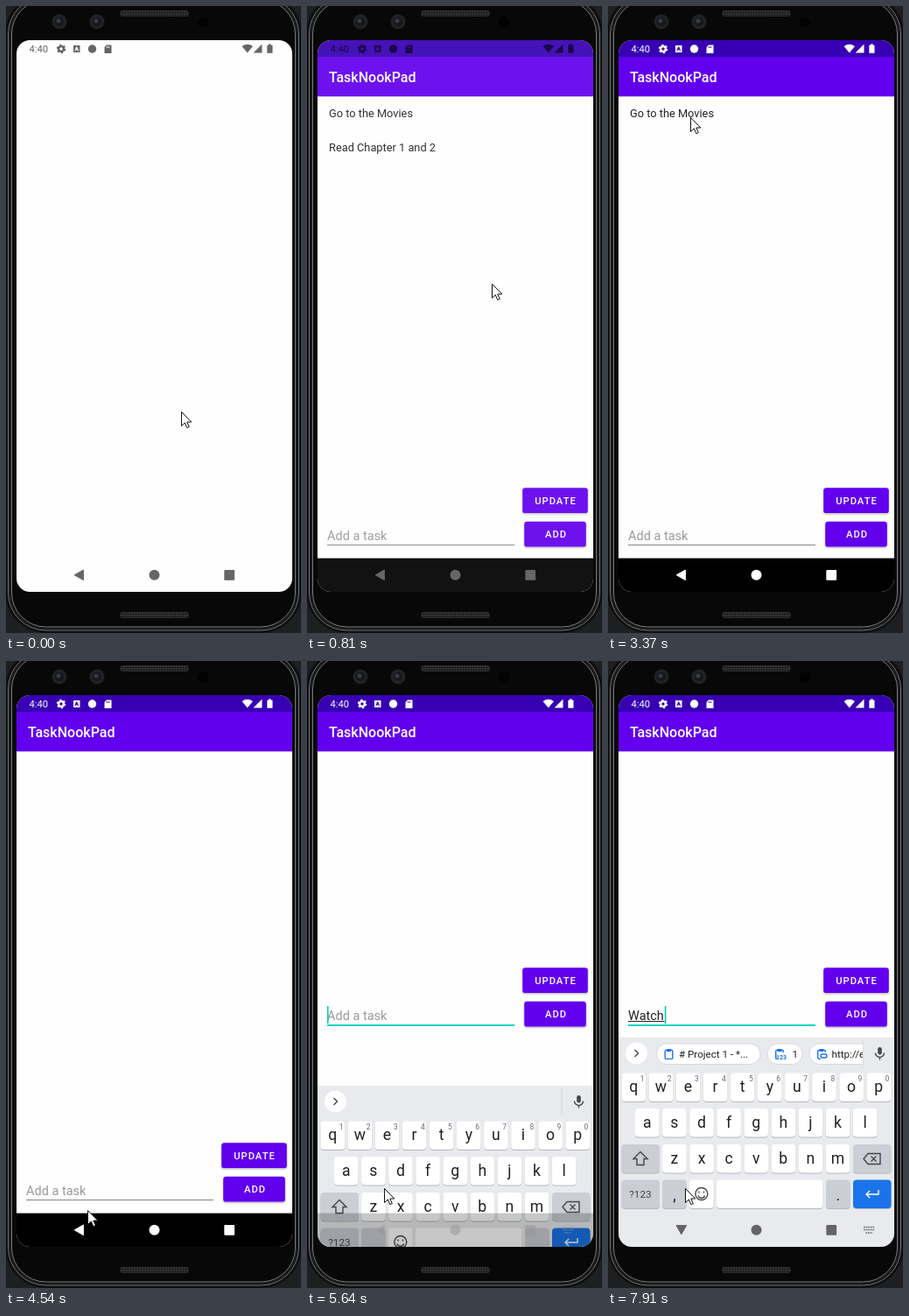
An HTML page that plays this animation: 337x716 px, repeating every 8000 ms.

```html
<!DOCTYPE html>
<html lang="en">
<head>
<meta charset="utf-8">
<title>Task list on a phone</title>
<style>
  html, body { margin: 0; width: 100%; height: 100%; overflow: hidden; background: #050505; }
  svg { display: block; width: 100%; height: 100%; font-family: Roboto, "Noto Sans", sans-serif; }
  text { white-space: pre; }
  .mid { text-anchor: middle; }
  .button { font-size: 11.2px; font-weight: 500; letter-spacing: 1px; fill: #fff; }
  .letter { font-size: 17.6px; fill: #1f2023; }
  .digit { font-size: 8.5px; fill: #666a70; }
  .chip { font-size: 11.6px; fill: #202124; }
  .line { fill: none; stroke: #43474c; stroke-width: 1.4; }
  .blue { fill: none; stroke: #1a73e8; stroke-width: 1.4; }
</style>
</head>
<body>
<svg viewBox="0 0 337 716">
  <defs>
    <clipPath id="screen"><rect x="12" y="39" width="315" height="630" rx="15.500"/></clipPath>
    <clipPath id="strip"><rect x="50" y="430" width="241" height="38"/></clipPath>
    <pattern id="mesh" width="3" height="3" patternUnits="userSpaceOnUse">
      <rect width="3" height="3" fill="#343434"/><circle cx="1.500" cy="1.500" r="1.100" fill="#121212"/>
    </pattern>
    <filter id="shadow" x="-10%" y="-20%" width="120%" height="150%">
      <feDropShadow dx="0" dy="1.2" stdDeviation=".9" flood-opacity=".3"/>
    </filter>
    <g id="clipboard">
      <rect x="-4.3" y="-4.6" width="8.6" height="10" rx="1" class="blue"/>
      <path d="M-2.5-6h5v3h-5z" fill="#1a73e8"/>
    </g>
  </defs>

  <g id="phone" fill="none">
    <rect width="337" height="716" fill="#1e1f21"/>
    <rect x="0" y="-14" width="337" height="729" rx="46" fill="#0b0b0b" stroke="#101010" stroke-width="2"/>
    <rect x="2.500" y="-11" width="332" height="724" rx="43" stroke="#77797b"/>
    <rect x="4.500" y="-9" width="328" height="720" rx="41" stroke="#1c1d1e" stroke-width="2"/>
    <rect x="6.500" y="-7" width="324" height="716" rx="39" fill="#080808" stroke="#7c7e80"/>
    <rect x="130" y="5" width="79" height="7" rx="3.500" fill="url(#mesh)"/>
    <rect x="130" y="692" width="79" height="7" rx="3.500" fill="url(#mesh)"/>
    <g id="lenses"></g>
    <circle cx="225" cy="18.500" r="6" fill="#020202"/>
  </g>

  <g clip-path="url(#screen)">
    <rect x="12" y="39" width="315" height="630" fill="#fefefe"/>
    <g id="app">
      <rect x="12" y="58" width="315" height="45.300" fill="#6200ee"/>
      <rect x="12" y="39" width="315" height="19.200" fill="#3700b3"/>
      <text x="25" y="87" font-size="16" font-weight="500" fill="#fff">TaskNookPad</text>
      <g font-size="12.8" fill="#222">
        <text id="first" x="25" y="127">Go to the Movies</text>
        <text id="second" x="25" y="165.500">Read Chapter 1 and 2</text>
      </g>
      <g id="form">
        <g fill="#6200ee" filter="url(#shadow)">
          <rect x="246.200" y="550.200" width="74.600" height="28.900" rx="3.200"/>
          <rect x="248.200" y="588.700" width="70.600" height="28.900" rx="3.200"/>
        </g>
        <text class="button mid" x="284" y="568.800">UPDATE</text>
        <text class="button mid" x="284.500" y="607.200">ADD</text>
        <path d="M23 615.500H237" stroke="#868686"/>
        <path id="focus" d="M23 616H237" stroke="#03d5c0" stroke-width="2"/>
        <text id="entry" x="23" y="609.500" font-size="14.5"></text>
        <path id="composing" stroke="#222"/>
        <rect id="caret" y="594" width="1.600" height="20" fill="#03cdb9"/>
      </g>
      <rect x="12" y="630.600" width="315" height="39"/>
    </g>

    <g id="status" fill="currentColor">
      <text x="26.500" y="53" font-size="11.2">4:40</text>
      <circle cx="63" cy="49" r="2.900" fill="none" stroke="currentColor" stroke-width="2.400"/>
      <circle cx="63" cy="49" r="4.600" fill="none" stroke="currentColor" stroke-width="1.300" stroke-dasharray="2.400 2.417"/>
      <path fill-rule="evenodd" d="M77 45h7.500v8h-7.500zM80.200 46.500l-2 5h1l.5-1.200h2l.5 1.200h1l-2-5z"/>
      <circle cx="98.500" cy="49" r="4.700"/>
      <path fill-rule="evenodd" d="M115 44.500h5.500v9.500h-8v-7zM115 46v2h1v-2zM117 46v2h1v-2z"/>
      <path d="M269.500 46Q275.800 41.500 282 46L275.800 53.500ZM292.500 43.500V53.500H282.500ZM299.800 43.500h3v1.200h1.700v9h-6.200v-9h1.500z"/>
    </g>

    <g id="keyboard">
      <rect x="12" y="430" width="315" height="240" fill="#e8eaed"/>
      <circle cx="32.500" cy="448" r="12.500" fill="#fff"/>
      <path class="line" d="M30.500 444l4 4-4 4"/>
      <path d="M291 432V465" stroke="#d5d8dc"/>
      <rect x="308.200" y="441" width="4.600" height="8.500" rx="2.300" fill="#43474c"/>
      <path class="line" d="M305.500 447.500a5 5 0 0 0 10 0M310.500 452.500v3"/>
      <g id="chips" clip-path="url(#strip)"></g>
      <g id="keys"></g>
    </g>
    <rect id="navShade" x="12" y="630.600" width="315" height="39"/>

    <g id="nav" fill="currentColor">
      <path id="back" d="M78.200 649.800L88.400 644V655.600Z" stroke="currentColor" stroke-linejoin="round"/>
      <circle cx="169.500" cy="649.800" r="6"/>
      <rect x="249.300" y="644" width="11.800" height="11.800" rx="1"/>
      <path id="imeIcon" d="M292 646.500h13M292 649.500h13M294.500 653h8" stroke="currentColor" stroke-width="1.600" stroke-dasharray="1.700 .9"/>
    </g>
  </g>

  <path id="pointer" d="M.5.500V16.500L4.300 13L6.800 18.700L9.300 17.600L6.800 12H11.800Z" fill="#fff" stroke="#111" stroke-linejoin="round"/>
</svg>

<script>
const LOOP = 8000, STEP = 60, PITCH = 31.1;
const $ = id => document.getElementById(id);
const clamp = v => Math.max(0, Math.min(1, v));
const show = (id, visible) => $(id).setAttribute('visibility', visible ? 'visible' : 'hidden');
const set = (id, attrs) => {
  for (const name in attrs) $(id).setAttribute(name, attrs[name]);
};

// Progress in discrete ticks; the first tick lands at the start time.
const ticks = (t, start, count) => clamp((Math.floor((t - start) / STEP) + 1) / count);

const key = (x, y, width, fill) =>
  `<rect x="${x}" y="${y + 1}" width="${width}" height="32.500" rx="4" fill="#b4b7bd"/>
   <rect x="${x}" y="${y}" width="${width}" height="32.500" rx="4" fill="${fill}"/>`;
const label = (x, y, content, kind = 'letter') =>
  `<text class="${kind} mid" x="${x}" y="${y}">${content}</text>`;

function letterRow(letters, center, y, digits = '') {
  return [...letters].map((letter, i) => {
    const x = center + i * PITCH;
    return key(x - 13.8, y, 27.6, '#fff') + label(x, y + 21.5, letter) +
      (digits ? label(x + 9.8, y + 9.5, digits[i], 'digit') : '');
  }).join('');
}

function buildKeyboard() {
  const gray = '#cbced4';
  $('keys').innerHTML =
    letterRow('qwertyuiop', 29.3, 470.5, '1234567890') +
    letterRow('asdfghjkl', 44.8, 511) +
    letterRow('zxcvbnm', 75.9, 552) +
    key(15.5, 552, 43.5, gray) + key(280, 552, 43.5, gray) +
    key(15.5, 592.5, 43.5, gray) + key(62, 592.5, 27.6, gray) +
    key(93, 592.5, 27.6, '#fff') + key(124, 592.5, 121.5, '#fff') +
    key(249, 592.5, 27.6, gray) + key(280, 592.5, 43.5, '#1a73e8') +
    `<text class="mid" x="37" y="613" font-size="11.800" fill="#43474c">?123</text>` +
    label(76, 616, ',') + label(262.8, 616, '.') +
    `<path class="line" d="M37 560.500l-8 8h4v7h8v-7h4z"/>
     <path class="line" d="M297 562.500h14v12h-14l-5-6zM300.500 565.500l6 6m0-6l-6 6"/>
     <circle class="line" cx="106.800" cy="608.500" r="7"/>
     <path class="line" d="M103 610.500a4 4 0 0 0 7.600 0M104 605.500v2M109.500 605.500v2"/>
     <path class="line" style="stroke:#fff" d="M309 604v5h-14M299 605l-4 4 4 4"/>`;

  const chip = (x, width, content) =>
    `<rect x="${x}" y="437" width="${width}" height="23.500" rx="11.700" fill="#fff" stroke="#d6d9de"/>
     <use href="#clipboard" x="${x + 14}" y="449"/>
     <text class="chip" x="${x + 25.5}" y="453">${content}</text>`;
  const badge = (x, content) =>
    `<path d="M${x} 447h8v8h-8z" fill="#fff"/>
     <text x="${x - 3}" y="454.500" font-size="7" font-weight="700" fill="#1a73e8">${content}</text>`;
  $('chips').innerHTML =
    chip(55.5, 118.5, '# Project 1 - *...') +
    chip(182, 40, ' 1') + badge(195, '123') +
    chip(230, 90, 'http://e') + badge(243, '') +
    '<rect class="blue" x="243" y="449" width="7" height="4" rx="2"/>';
}

function buildLenses() {
  $('lenses').innerHTML = [61, 104].map(x =>
    `<circle cx="${x}" cy="18" r="8.500" fill="#202225"/>
     <circle cx="${x}" cy="18" r="5" fill="#15171a"/>
     <circle cx="${x - 1}" cy="17" r="2.500" fill="#383c42"/>`).join('');
}

// Each move: start time, tick count, waypoints.
const moves = [
  [180, 10, [[200, 463], [211, 317]]],
  [1320, 5, [[211, 317], [209, 312], [170, 420], [133, 513]]],
  [1850, 10, [[133, 513], [124, 340], [106, 153], [104, 156]]],
  [3250, 3, [[104, 156], [94, 127]]],
  [4420, 3, [[94, 127], [84, 250], [78, 480], [93, 627]]],
  [4800, 7, [[93, 627], [88, 602]]]
];

function pointerAt(t) {
  const [start, count, points] = moves.filter(m => m[0] <= t).pop() || moves[0];
  const p = ticks(t, start, count) * (points.length - 1);
  const i = Math.min(Math.floor(p), points.length - 2);
  return points[i].map((v, axis) => v + (points[i + 1][axis] - v) * (p - i));
}

// Text edges after 0 to 5 letters; the underline trails the typing.
const edges = [23, 36, 44, 49, 57, 64.5];
const typed = [6430, 7120, 7180, 7430, 7690];
const underlined = [6690, 7180, 7490, 7730, 7910];
const passed = (times, t) => times.filter(time => time <= t).length;

function drawForm(t) {
  const count = passed(typed, t);
  set('form', { transform: `translate(0 ${t >= 5580 ? -200 : 0})` });
  set('focus', { opacity: ticks(t, 5340, 3) });
  $('entry').textContent = count ? 'Watch'.slice(0, count) : 'Add a task';
  set('entry', { fill: count ? '#222' : '#999' });
  set('composing', { d: `M23 611.500H${edges[passed(underlined, t)]}` });
  show('composing', t >= underlined[0]);
  set('caret', { x: edges[count] + (count ? .3 : 0) });
  show('caret', t >= 5400);
}

function drawKeyboard(t) {
  const tick = 5340 + Math.floor((t - 5340) / STEP) * STEP;
  const offset = 55 * Math.exp((5640 - tick) / STEP);
  show('keyboard', t >= 5580);
  set('keyboard', { transform: `translate(0 ${offset < 1 ? 0 : Math.min(offset, 240)})` });
  set('chips', { opacity: ticks(t, 5880, 2) });

  const change = ticks(t, 5580, 3);
  set('navShade', { opacity: t < 5580 ? 0 : [.6, .22, 0][Math.round(change * 3) - 1] });
  set('back', { transform: `rotate(${-90 * ticks(t, 5700, 3)} 83.500 649.500)` });
  show('imeIcon', t >= 5460);
  const tone = t < 1080 ? 102 : 255 - 155 * change;
  set('nav', { color: `rgb(${tone},${tone},${tone})`, opacity: t >= 5640 && t < 5700 ? .55 : 1 });
}

function draw(t) {
  const fade = clamp((t - 560) / 340);
  set('app', { opacity: 1 - (1 - fade) ** 2 });
  set('status', { color: t < 1080 ? 'rgba(0,0,0,.6)' : '#fff' });
  show('first', t < 4050);
  show('second', t < 2940);
  drawForm(t);
  drawKeyboard(t);
  set('pointer', { transform: `translate(${pointerAt(t)})` });
}

buildLenses();
buildKeyboard();
const began = performance.now();
function loop() {
  draw((performance.now() - began) % LOOP);
  requestAnimationFrame(loop);
}
loop();
</script>
</body>
</html>
```
